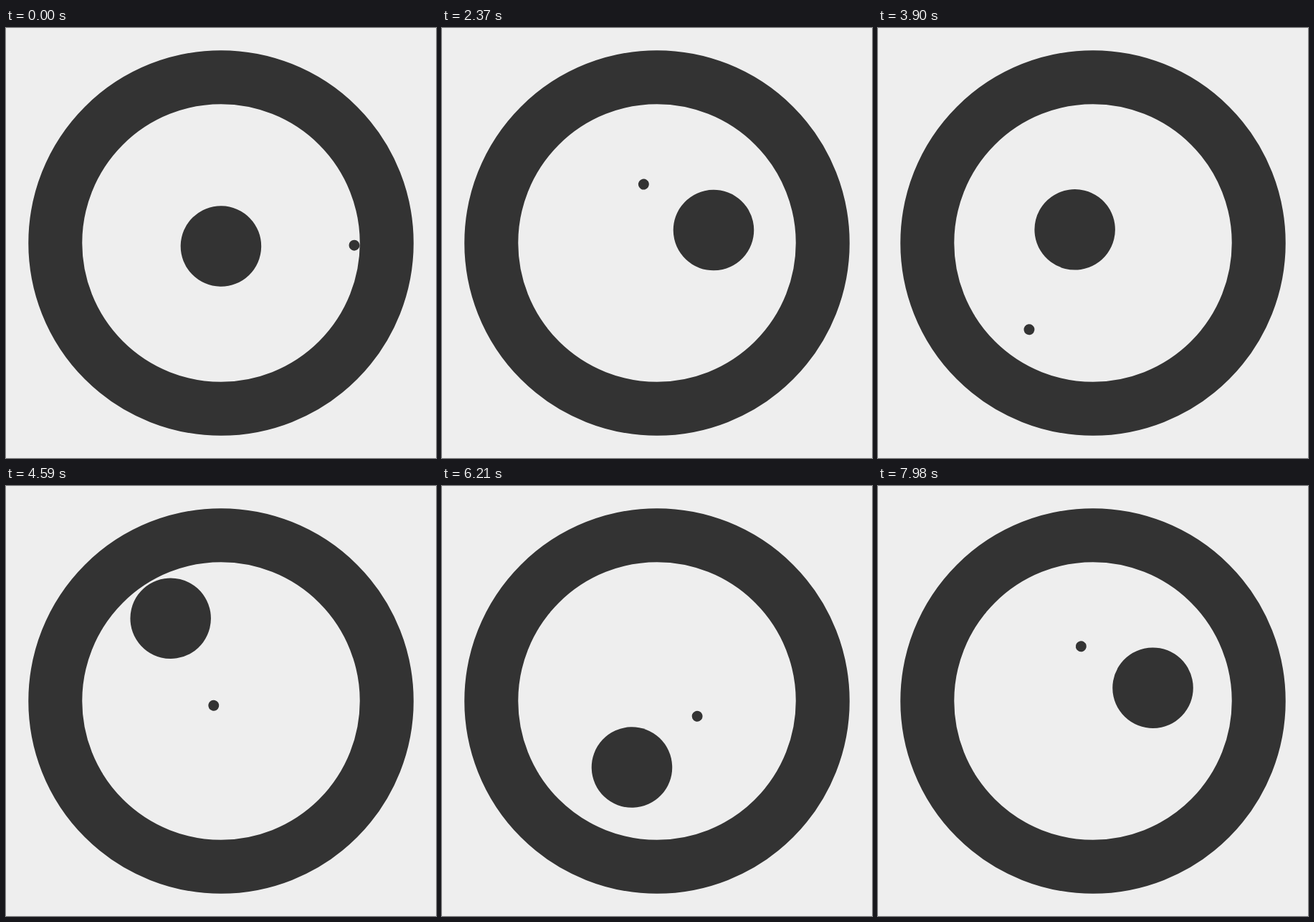
Animation of 600 by 600 pixels, one loop 8 s. Source, as an HTML page:

```html
<!DOCTYPE html>
<html lang="en">
<head>
<meta charset="utf-8">
<title>Two balls on a turning cross</title>
<style>
  html, body { margin: 0; height: 100%; overflow: hidden; background: #eee; }
  svg { display: block; width: 100vw; height: 100vh; }
</style>
</head>
<body>
<svg viewBox="-300 -300 600 600" fill="#333">
  <circle r="231.25" fill="none" stroke="#333" stroke-width="75"/>
  <g id="cross">
    <circle id="small" r="7.5"/>
    <circle id="big" r="56.25"/>
  </g>
</svg>
<script>
  const LOOP = 8000, STEP = 30;
  const TURN = 0.965;   // degrees per step
  const QUARTER = 31;   // steps from the centre to the wall
  const cross = document.getElementById('cross');
  const small = document.getElementById('small');
  const big = document.getElementById('big');

  // Triangle wave that starts at its peak: 1 -> -1 -> 1 over four quarters.
  function triangle(step) {
    const phase = (step / QUARTER + 4) % 4;
    return Math.abs(phase - 2) - 1;
  }

  function draw() {
    const step = Math.floor(performance.now() % LOOP / STEP);
    cross.setAttribute('transform', `rotate(${(step + 1) * TURN})`);
    small.setAttribute('cx', 6 * QUARTER * triangle(step));
    big.setAttribute('cy', 4.5 * QUARTER * triangle(step + 1 - QUARTER));
    requestAnimationFrame(draw);
  }
  draw();
</script>
</body>
</html>
```
